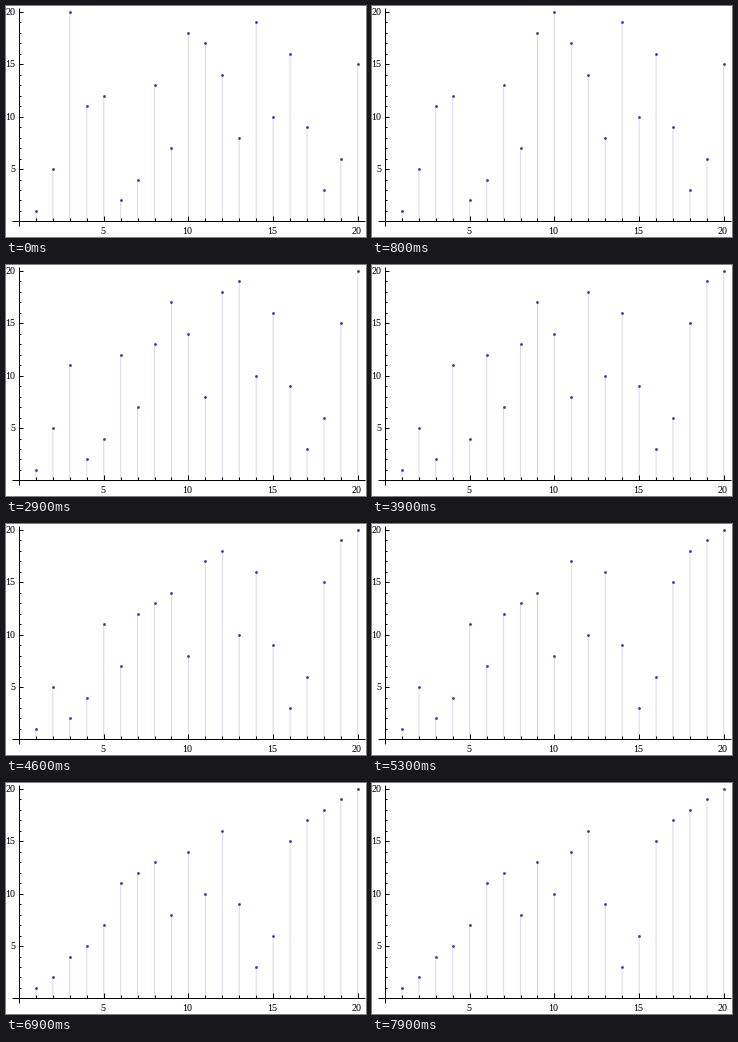
Animation, 360 px wide and 231 px high, one loop 8000 ms. Source, as a matplotlib script:

```python
import math

import matplotlib.pyplot as plt
from matplotlib.animation import FuncAnimation
from matplotlib.patches import Circle

W, H, DPI = 360, 231, 100
PX = 72 / DPI
START = [1, 5, 20, 11, 12, 2, 4, 13, 7, 18, 17, 14, 8, 19, 10, 16, 9, 3, 6, 15]
N = len(START)
FRAMES, STEP_MS = 80, 100
DOT, STEM = "#3d3d99", "#d8d8eb"

# Crisp, fully hinted small digits
plt.rcParams["text.hinting"] = "native"
plt.rcParams["text.hinting_factor"] = 1


def px(i):
    return 13.02 + 16.94 * i


def py(v):
    return 6 + 10.47 * (N - v)


def snap(p):
    """Centre of the pixel that holds p after a half-pixel shift."""
    return math.floor(p - 0.5) + 0.5


def bubble_states(values, count):
    """Array after each single comparison of a bubble sort."""
    a, states = list(values), []
    for end in range(len(a) - 1, 0, -1):
        for j in range(end):
            if a[j] > a[j + 1]:
                a[j], a[j + 1] = a[j + 1], a[j]
            states.append(list(a))
            if len(states) == count:
                return states
    return states


states = bubble_states(START, FRAMES)

fig = plt.figure(figsize=(W / DPI, H / DPI), dpi=DPI, facecolor="white")
ax = fig.add_axes([0, 0, 1, 1])
ax.set_xlim(0, W)
ax.set_ylim(H, 0)
ax.axis("off")

x0, y0 = snap(px(0)), snap(py(0))
stems = ax.vlines([px(i + 1) for i in range(N)], y0, y0, colors=STEM,
                  linewidths=PX, zorder=1, snap=False)
dots = [ax.add_patch(Circle((0, 0), 1.4, fc=DOT, lw=0, zorder=4))
        for _ in range(N)]

# Axes, ticks and labels
line = dict(colors="black", linewidths=PX, zorder=3)
ax.hlines(y0, 6, 359, **line)
ax.vlines(x0, 2, 220, **line)
font = dict(family="Liberation Serif", size=10 * PX, va="baseline")
for k in range(1, N + 1):
    major = k % 5 == 0
    size = 4.5 if major else 2.5
    x, y = snap(px(k)), snap(py(k))
    ax.hlines(y, x0, x0 + size, **line)
    ax.vlines(x, y0 - size, y0, **line)
    if major:
        ax.text(9.5, y + 3.5, str(k), ha="right", **font)
        ax.text(x - 0.5, 228, str(k), ha="center", **font)


def draw(n):
    points = [(px(i), py(v)) for i, v in enumerate(states[n], 1)]
    stems.set_segments([[(x, y), (x, y0)] for x, y in points])
    for dot, (x, y) in zip(dots, points):
        dot.center = snap(x) + 1, snap(y) + 1
    return [stems, *dots]


anim = FuncAnimation(fig, draw, frames=FRAMES, interval=STEP_MS,
                     init_func=lambda: draw(0), repeat=True, repeat_delay=0)
plt.show()
```
